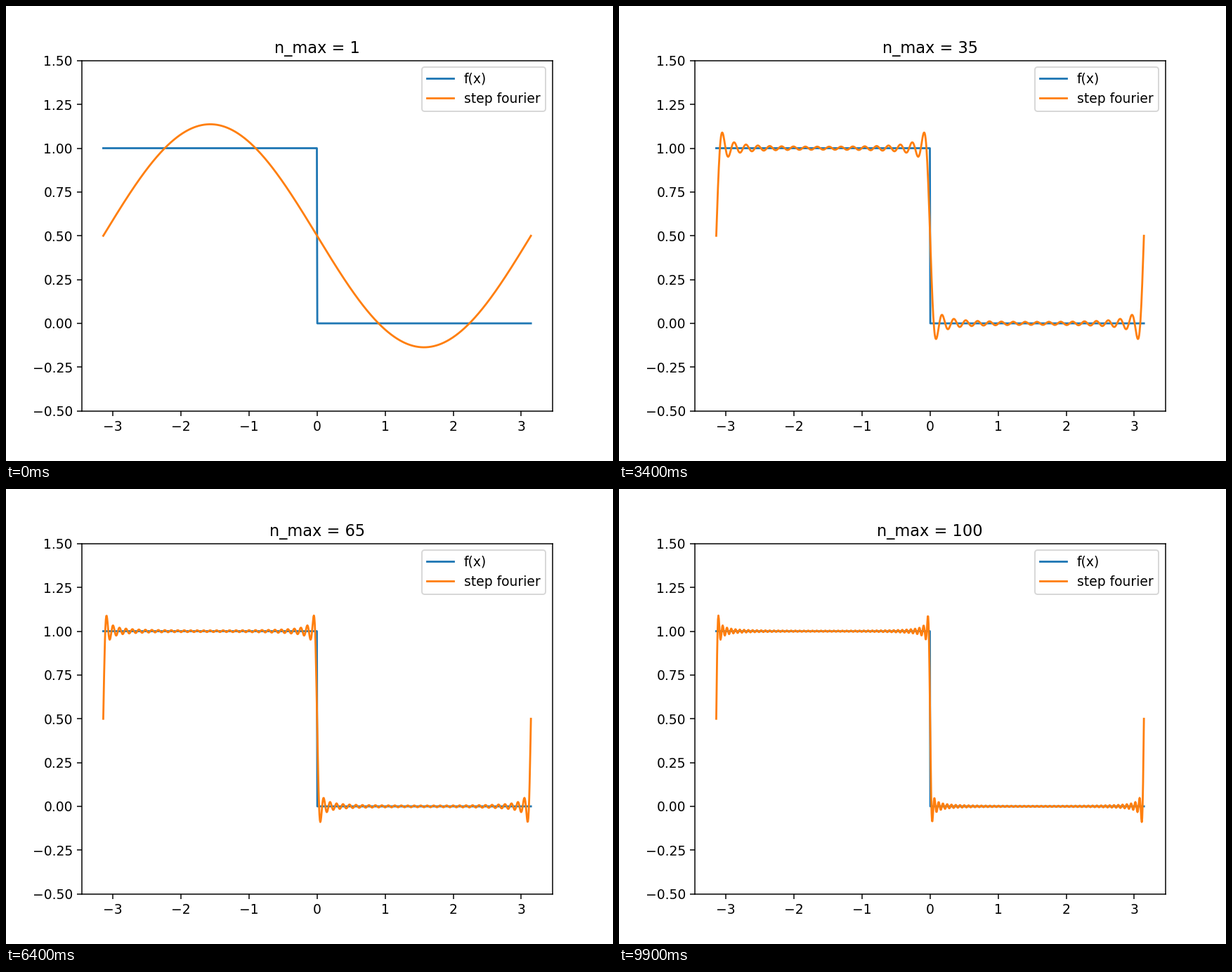
Animation of 864 by 648 pixels, one loop 10000 ms. Source, as a matplotlib script:

```python
import numpy as np
import matplotlib.pyplot as plt
from matplotlib.animation import FuncAnimation

N_FRAMES = 100
INTERVAL = 100

plt.rcParams["font.family"] = "DejaVu Sans"

x = np.linspace(-np.pi, np.pi, 1000)


def step(x):
    return np.where(x < 0, 1.0, 0.0)


def fourier(x, n_max):
    """Partial Fourier sum of the step; only odd harmonics contribute."""
    n = np.arange(1, n_max + 1, 2)[:, None]
    return 0.5 - 2 / np.pi * (np.sin(n * x) / n).sum(axis=0)


fig, ax = plt.subplots(figsize=(6.4, 4.8), dpi=135)
ax.plot(x, step(x), color="#1f77b4", label="f(x)")
curve, = ax.plot(x, fourier(x, 1), color="#ff7f0e", label="step fourier")
ax.set_ylim(-0.5, 1.5)
ax.legend(loc="upper right")
title = ax.set_title("n_max = 1")


def update(i):
    n_max = i + 1
    curve.set_ydata(fourier(x, n_max))
    title.set_text(f"n_max = {n_max}")
    return curve, title


anim = FuncAnimation(fig, update, frames=N_FRAMES, interval=INTERVAL,
                     repeat=True, repeat_delay=0, blit=False)
plt.show()
```
